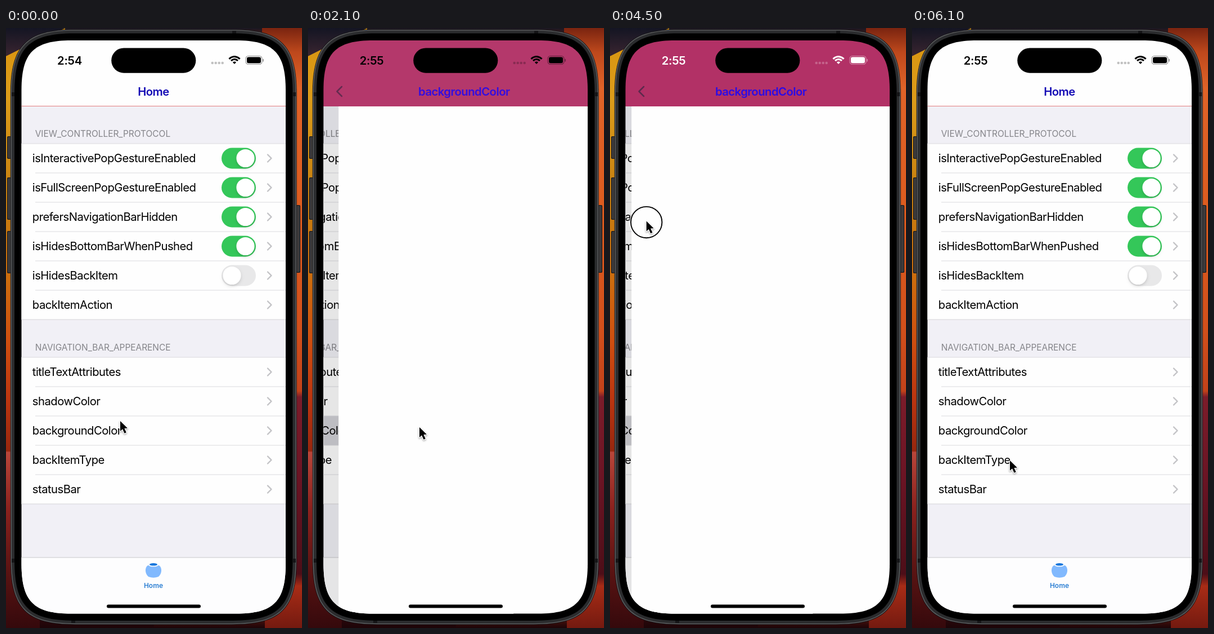
Animation, 526 px wide and 1064 px high, one loop 6.2 s. Source, as an HTML page with a canvas:

```html
<!DOCTYPE html>
<html lang="en">
<head>
<meta charset="utf-8">
<title>Navigation demo</title>
<style>
  html, body { margin: 0; width: 100%; height: 100%; overflow: hidden; background: #000; }
  canvas { display: block; width: 526px; height: 1064px; }
</style>
</head>
<body>
<canvas id="stage" width="526" height="1064"></canvas>
<script>
const ctx = document.getElementById('stage').getContext('2d');
const LOOP = 6200;
const RELEASE = 4955;
const SCREEN = { x: 27.5, y: 22, w: 469.5, h: 1016.5, r: 65.6 };
const NAV_BOTTOM = 139;
const FONT = 'Inter, Roboto, sans-serif';

const sections = [
  { title: 'VIEW_CONTROLLER_PROTOCOL', top: 205, rows: [
    ['isInteractivePopGestureEnabled', true], ['isFullScreenPopGestureEnabled', true],
    ['prefersNavigationBarHidden', true], ['isHidesBottomBarWhenPushed', true],
    ['isHidesBackItem', false], ['backItemAction']] },
  { title: 'NAVIGATION_BAR_APPEARENCE', top: 584, rows: [
    ['titleTextAttributes'], ['shadowColor'], ['backgroundColor'], ['backItemType'], ['statusBar']] }
];

const clamp = v => Math.min(1, Math.max(0, v));
const lerp = (a, b, k) => a + (b - a) * k;
const ramp = (t, from, to) => clamp((t - from) / (to - from));
const smooth = k => k * k * (3 - 2 * k);
const springLeft = (ms, rate) => {
  const s = rate * Math.max(0, ms) / 1000;
  return (1 + s) * Math.exp(-s);
};

function rect(color, x, y, w, h) {
  ctx.fillStyle = color;
  ctx.fillRect(x, y, w, h);
}
function roundPath(x, y, w, h, r) {
  ctx.beginPath();
  ctx.roundRect(x, y, w, h, r);
}
function pill(color, x, y, w, h, r = h / 2) {
  roundPath(x, y, w, h, r);
  ctx.fillStyle = color;
  ctx.fill();
}
// Screen outline grown by a margin, with continuous-curvature corners.
function devicePath(margin) {
  const left = SCREEN.x - margin, top = SCREEN.y - margin;
  const right = SCREEN.x + SCREEN.w + margin, bottom = SCREEN.y + SCREEN.h + margin;
  const r = SCREEN.r + margin, far = 1.35 * r, near = .33 * r;
  ctx.beginPath();
  ctx.moveTo(left + far, top);
  ctx.lineTo(right - far, top);
  ctx.bezierCurveTo(right - near, top, right, top + near, right, top + far);
  ctx.lineTo(right, bottom - far);
  ctx.bezierCurveTo(right, bottom - near, right - near, bottom, right - far, bottom);
  ctx.lineTo(left + far, bottom);
  ctx.bezierCurveTo(left + near, bottom, left, bottom - near, left, bottom - far);
  ctx.lineTo(left, top + far);
  ctx.bezierCurveTo(left, top + near, left + near, top, left + far, top);
  ctx.closePath();
}
function dot(color, x, y, r) {
  ctx.beginPath();
  ctx.arc(x, y, r, 0, 7);
  ctx.fillStyle = color;
  ctx.fill();
}
function polygon(color, points) {
  ctx.beginPath();
  points.forEach(p => ctx.lineTo(...p));
  ctx.closePath();
  ctx.fillStyle = color;
  ctx.fill();
}
function strokeLine(color, width, points) {
  ctx.beginPath();
  points.forEach(p => ctx.lineTo(...p));
  ctx.strokeStyle = color;
  ctx.lineWidth = width;
  ctx.stroke();
}
function text(str, x, y, { size = 20.3, weight = 400, color = '#000', spacing = -0.54, align = 'left' } = {}) {
  ctx.font = `${weight} ${size}px ${FONT}`;
  ctx.letterSpacing = spacing + 'px';
  ctx.textAlign = align;
  ctx.fillStyle = color;
  ctx.fillText(str, x, y);
}
function vertical(y0, y1, ...stops) {
  const g = ctx.createLinearGradient(0, y0, 0, y1);
  stops.forEach(([at, color]) => g.addColorStop(at, color));
  return g;
}

// Progress: 1 = list in place, 0 = detail page in place.
function listProgress(t) {
  if (t < 1850) return 1;
  if (t < 4400) return springLeft(t - 1850, 18.26);
  const dragged = (dragPoint(t).x - 54) / SCREEN.w;
  return t < RELEASE ? dragged : 1 - (1 - dragged) * springLeft(t - RELEASE, 23);
}
function dragPoint(t) {
  const s = (Math.min(t, RELEASE) - 4400) / 400;
  return { x: 54 + 168 * s * s, y: 339 + 42 * Math.pow(s, 1.8) };
}
function cursorAt(t) {
  const move = (a, b, k) => ({ x: lerp(a.x, b.x, k), y: lerp(a.y, b.y, k) });
  const tap = { x: 198, y: 708 }, edge = { x: 54, y: 339 };
  if (t < 2400) return move({ x: 203, y: 697 }, tap, smooth(ramp(t, 100, 600)));
  if (t < 4400) return move(tap, edge, smooth(ramp(t, 2500, 3750)));
  return move(dragPoint(t), { x: 174, y: 767 }, smooth(ramp(t, 5250, 5900)));
}

function drawWallpaper() {
  rect(vertical(0, 1064, [0, '#d9940f'], [.12, '#dc9c1a'], [.28, '#c67f10'], [.42, '#cc6c0e'],
    [.52, '#cf4f10'], [.62, '#bb3510'], [.705, '#97270e'], [.707, '#b8463a'], [.8, '#8c221e'],
    [.9, '#5c1413'], [1, '#35090c']), 0, 0, 263, 1064);
  rect(vertical(0, 1064, [0, '#7a2410'], [.04, '#bd481c'], [.1, '#e06328'], [.3, '#dc5c1f'],
    [.5, '#d2501b'], [.605, '#c2421a'], [.615, '#7c1c2a'], [.75, '#6b1424'], [.91, '#4d0e18'],
    [.93, '#a82c16'], [1, '#741a10']), 263, 0, 263, 1064);
  rect(vertical(0, 26, [0, '#181722'], [1, '#7b210e']), 105, 0, 350, 26);
  polygon(vertical(0, 50, [0, '#141523'], [1, '#3a2530']), [[0, 0], [106, 0], [60, 20], [0, 50]]);
  rect(vertical(1030, 1064, [0, 'rgba(30,4,8,0)'], [1, '#1d0508']), 60, 1030, 400, 34);
}

function drawPhone() {
  const buttons = [[2, 192, 40], [2, 265, 75], [2, 360, 75], [515, 314, 120]];
  buttons.forEach(([x, y, h]) => {
    pill('#17171a', x, y, 8, h, 2);
    pill('#3c3a3b', x + 1, y + 1, 6, h - 2, 2);
  });
  const shells = [['#141416', 19.7], ['#626365', 18.8], ['#2b2c2e', 17.4]];
  const layer = ([color, margin]) => {
    devicePath(margin);
    ctx.fillStyle = color;
    ctx.fill();
  };
  shells.forEach(layer);
  [[10, 114, 5, 7], [510, 114, 5, 7], [10, 941, 5, 7], [510, 941, 5, 7], [402, 5, 7, 5], [116, 1050, 7, 5]]
    .forEach(b => rect('#151517', ...b));
  layer(['#000', 12.4]);
}

function drawChevron(color, width, x, y, dx, dy) {
  ctx.lineCap = ctx.lineJoin = 'round';
  strokeLine(color, width, [[x - dx, y - dy], [x, y], [x - dx, y + dy]]);
}

function drawSwitch(x, y, on) {
  pill(on ? '#34c759' : '#e8e8e9', x, y - 18.5, 61, 37);
  ctx.save();
  ctx.shadowColor = 'rgba(0,0,0,.15)';
  ctx.shadowBlur = 5;
  ctx.shadowOffsetY = 2.5;
  dot('#fff', x + (on ? 42.5 : 18.5), y, 16.1);
  ctx.restore();
}

function drawTab() {
  rect('#fdfdfe', 27, 939, 471, 100);
  rect('#c9c9cc', 27, 938.5, 471, 1);
  ctx.beginPath();
  ctx.moveTo(252, 953);
  ctx.bezierCurveTo(246, 957, 247, 968, 253, 973);
  ctx.quadraticCurveTo(262, 976.5, 271, 973);
  ctx.bezierCurveTo(277, 968, 278, 957, 272, 953);
  ctx.closePath();
  ctx.fillStyle = '#81b9fe';
  ctx.fill();
  [['#fdfdfe', 9.5, 4], ['#1776dc', 7, 2.3]].forEach(([color, rx, ry]) => {
    ctx.beginPath();
    ctx.ellipse(262, 951.3, rx, ry, 0, 0, 7);
    ctx.fillStyle = color;
    ctx.fill();
  });
  text('Home', 262, 993, { size: 12, weight: 600, color: '#2c7fd3', spacing: 0, align: 'center' });
}

function drawList(selected) {
  rect('#f1f0f6', 27, NAV_BOTTOM, 471, 900);
  for (const { title, top, rows } of sections) {
    text(title, 51.7, top - 12.5, { size: 15.5, color: '#85858a', spacing: -0.05 });
    rect('#fefefe', 27, top, 471, rows.length * 52);
    rows.forEach(([label, on], i) => {
      const y = top + i * 52, mid = y + 26;
      if (label === 'backgroundColor' && selected > 0) {
        rect(`rgba(209,209,214,${selected})`, 27, y, 471, 52);
      }
      const inset = i ? 25 : 0;
      rect('#dcdcdf', 27 + inset, y - .5, 471 - inset, 1);
      text(label, 46.8, mid + 7.3);
      if (on !== undefined) drawSwitch(383, mid, on);
      drawChevron('#c3c3c6', 2.4, 471.5, mid, 6.5, 6.5);
    });
    rect('#d5d5d8', 27, top + rows.length * 52 - .5, 471, 1);
  }
  drawTab();
}

function drawNav(p) {
  const mix = [[176, 254], [44, 254], [98, 254]].map(([a, b]) => Math.round(lerp(a, b, p)));
  rect(`rgb(${mix})`, 27, 21, 471, NAV_BOTTOM - 21);
  rect(`rgba(214,60,60,${.65 * p})`, 27, NAV_BOTTOM - 1, 471, 1);
  const faded = (alpha, draw) => {
    if (alpha <= 0) return;
    ctx.globalAlpha = alpha;
    draw();
    ctx.globalAlpha = 1;
  };
  const style = { weight: 600, align: 'center' };
  faded(clamp((p - .4) / .6), () =>
    text('Home', 262 - 130 * (1 - p), 119.6, { ...style, color: '#1208b4' }));
  faded(1 - Math.pow(clamp(p / .35), 1.5), () =>
    text('backgroundColor', 262 + 268 * p, 119.6, { ...style, color: '#2a0be8' }));
  faded(clamp(1 - 2.3 * p), () => drawChevron('#592a4b', 2.5, 51.5, 112.5, -8.5, 8.5));
}

function drawStatus(t) {
  const white = smooth(ramp(t, 2200, 2400)) * (1 - smooth(ramp(t, 5200, 5450)));
  const v = Math.round(255 * white);
  const ink = a => `rgba(${v},${v},${v},${a})`;
  text(t < 1500 ? '2:54' : '2:55', 113, 64.6, { weight: 600, color: ink(1), spacing: -.3, align: 'center' });
  for (let i = 0; i < 4; i++) dot(ink(.24), 366.7 + i * 6, 62, 2.3);

  ctx.lineCap = 'butt';
  ctx.strokeStyle = ink(1);
  ctx.lineWidth = 3.1;
  [12.6, 7.8].forEach(r => {
    ctx.beginPath();
    ctx.arc(406, 63.3, r, -Math.PI * .77, -Math.PI * .23);
    ctx.stroke();
  });
  ctx.beginPath();
  ctx.moveTo(406, 64);
  ctx.arc(406, 63.6, 4.2, -Math.PI * .77, -Math.PI * .23);
  ctx.fillStyle = ink(1);
  ctx.fill();

  roundPath(426, 49.5, 29, 15, 5);
  ctx.strokeStyle = ink(.4);
  ctx.lineWidth = 1.2;
  ctx.stroke();
  pill(ink(1), 428, 51.5, 25, 11, 3.2);
  pill(ink(.4), 456.3, 54.7, 1.7, 5, 1);
}

function drawCursor(t) {
  const { x, y } = cursorAt(t);
  const pressed = (t >= 1650 && t < 1800) || (t >= 4150 && t < RELEASE);
  if (pressed) {
    [['#fff', 29.2, 1.4], ['#000', 27.7, 1.9]].forEach(([color, r, width]) => {
      ctx.beginPath();
      ctx.arc(x, y + 2, r, 0, 7);
      ctx.strokeStyle = color;
      ctx.lineWidth = width;
      ctx.stroke();
    });
  }
  const arrow = [[0, 0], [0, 18], [4.1, 14.3], [7.5, 21.7], [10.8, 20.2], [7.4, 13], [13, 12.8]];
  ctx.save();
  ctx.translate(x, y);
  ctx.shadowColor = 'rgba(0,0,0,.35)';
  ctx.shadowBlur = 3;
  ctx.shadowOffsetY = 1.5;
  ctx.lineJoin = 'round';
  strokeLine('#fff', 2.6, [...arrow, arrow[0]]);
  ctx.shadowColor = 'transparent';
  polygon('#000', arrow);
  ctx.restore();
}

function draw(t) {
  const p = listProgress(t);
  const selected = t < 1700 ? 0 : t < 4400 ? 1 : 1 - p;
  drawWallpaper();
  drawPhone();

  ctx.save();
  devicePath(0);
  ctx.clip();
  ctx.save();
  ctx.translate(-.3 * SCREEN.w * (1 - p), 0);
  drawList(selected);
  ctx.restore();
  if (p < 1) {
    rect(`rgba(0,0,0,${.1 * (1 - p)})`, 27, NAV_BOTTOM, 471, 900);
    rect('#fefefe', SCREEN.x + SCREEN.w * p, NAV_BOTTOM, 471, 900);
  }
  drawNav(p);
  drawStatus(t);
  ctx.restore();

  pill('#000', 187.2, 35.4, 150.2, 44.4);
  pill('#000', 179, 1022.5, 167, 6);
  drawCursor(t);
}

function frame() {
  draw(performance.now() % LOOP);
  requestAnimationFrame(frame);
}
frame();
</script>
</body>
</html>
```
